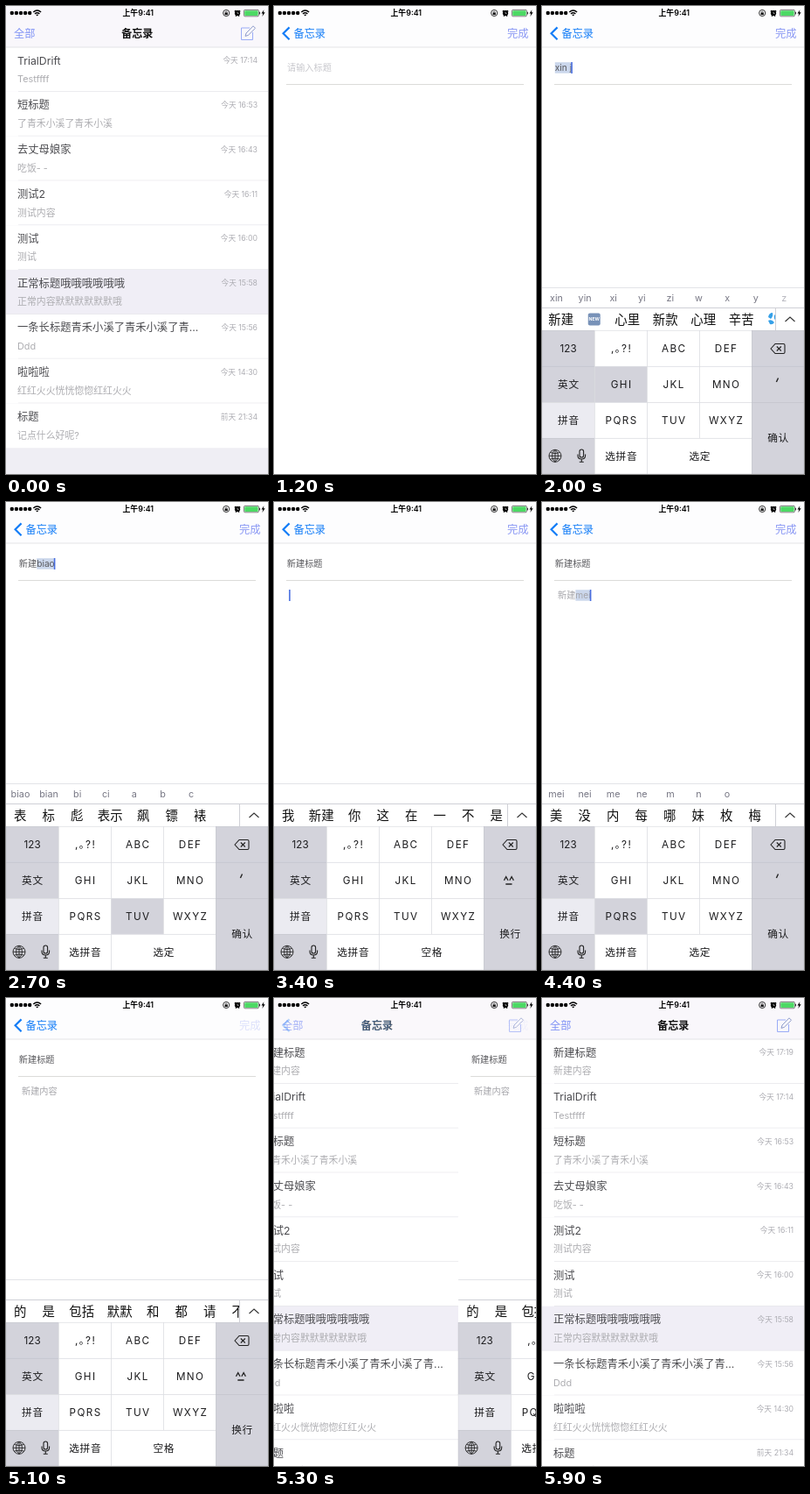
Recreate the animation shown at these times as an HTML page. Size 300 px wide and 534 px high, loop 6 s.

```html
<!DOCTYPE html>
<html lang="zh-CN">
<head>
<meta charset="utf-8">
<title>备忘录</title>
<style>
html, body { margin: 0; width: 100%; height: 100%; overflow: hidden; background: #fff; }
svg { display: block; width: 300px; height: 534px; font-family: Inter, "Noto Sans CJK SC", "Noto Sans CJK", sans-serif; }
text { white-space: pre; }
</style>
</head>
<body>
<svg id="stage" viewBox="0 0 300 534"></svg>
<script>
const NS = 'http://www.w3.org/2000/svg';
const stage = document.getElementById('stage');
const LOOP = 6000, STEP = 100;

function el(parent, tag, attrs = {}) {
  const node = document.createElementNS(NS, tag);
  for (const k in attrs) node.setAttribute(k, attrs[k]);
  parent.appendChild(node);
  return node;
}
const group = parent => el(parent, 'g');
const rect = (parent, x, y, width, height, fill, more) => el(parent, 'rect', { x, y, width, height, fill, ...more });
const line = (parent, d, stroke, width = 1, more) =>
  el(parent, 'path', { d, fill: 'none', stroke, 'stroke-width': width, ...more });

// Text is placed by its vertical centre.
function label(parent, x, mid, text, size, fill, more) {
  const node = el(parent, 'text', { x, y: mid + size * 0.38, 'font-size': size, fill, ...more });
  node.textContent = text;
  return node;
}
const centered = { 'text-anchor': 'middle' };
const move = (node, x, y = 0) => node.setAttribute('transform', `translate(${x} ${y})`);
const show = (node, on) => node.setAttribute('display', on ? 'inline' : 'none');
const fade = (node, v) => node.setAttribute('opacity', v);

// ---- note list ----
const ROW = 50.8, TOP = 47;
const list = group(stage);
rect(list, 0, TOP, 300, 487, '#efeef4');
const notes = [
  ['新建标题', '新建内容', '今天 17:19'],
  ['TrialDrift', 'Testffff', '今天 17:14'],
  ['短标题', '了青禾小溪了青禾小溪', '今天 16:53'],
  ['去丈母娘家', '吃饭- -', '今天 16:43'],
  ['测试2', '测试内容', '今天 16:11'],
  ['测试', '测试', '今天 16:00'],
  ['正常标题哦哦哦哦哦哦', '正常内容默默默默默默哦', '今天 15:58'],
  ['一条长标题青禾小溪了青禾小溪了青...', 'Ddd', '今天 15:56'],
  ['啦啦啦', '红红火火恍恍惚惚红红火火', '今天 14:30'],
  ['标题', '记点什么好呢?', '前天 21:34']
];
const rows = notes.map(([title, body, date], i) => {
  const row = group(list), marked = i === 6, last = i === notes.length - 1;
  rect(row, 0, 0, 300, ROW, marked ? '#f0eef6' : '#fff');
  if (!last) line(row, `M${marked ? 0 : 14} ${ROW - 0.3}H300`, '#e3e2e7', 0.8);
  label(row, 13, 15, title, 12.3, '#4c4c50');
  label(row, 13, 36, body, 10.9, '#adadb1');
  label(row, 288, 15, date, 8.7, '#adadb3', { 'text-anchor': 'end' });
  return row;
});

// ---- editor ----
const editor = group(stage);
rect(editor, 0, 0, 300, 534, '#fff');
line(editor, 'M14 89.5H286', '#d8d8d5', 0.9);
const hint = label(editor, 15, 70, '请输入标题', 10.2, '#c9c9ce');
const mark = rect(editor, 0, 0, 0, 12.5, '#cbd7ec');
const fields = [
  { x: 14.8, mid: 70.4, fill: '#5a5a5e' },
  { x: 18, mid: 106.4, fill: '#a6a6ab' }
];
for (const f of fields) f.node = label(editor, f.x, f.mid, '', 10.2, f.fill);
const caret = rect(editor, 0, 0, 1.6, 13, '#4a6fe0');

// ---- keyboard ----
const board = group(editor);
const GRAY = '#d3d3db', RULE = '#cfd0d6';
rect(board, 0, 321, 300, 213, '#fff');
const pinyinBar = group(board), wordBar = group(board);
rect(board, 267.5, 345, 33, 26, '#fff');
line(board, 'M0 321.5H300', '#e3e4e8');
line(board, 'M0 344.5H300M267.5 345V370', RULE);
line(board, 'M278.5 360L284 355L289.5 360', '#333', 1.1);

const colX = [0, 60.3, 120.5, 180.5, 240.4, 300];
const rowY = [370.3, 411.3, 452.4, 493.3, 534];
const keys = {};
function key(name, col, r, fill, cols = 1, span = 1) {
  const x = colX[col], y = rowY[r];
  const w = colX[col + cols] - x, h = rowY[r + span] - y;
  const stroke = fill === GRAY ? '#c4c5cd' : '#dcdde2';
  const face = rect(board, x, y, w, h, fill, { stroke, 'stroke-width': 0.7 });
  if (!name) return;
  const latin = /^[ -~]+$|｡/.test(name);
  const gap = name === '123' ? 0 : latin ? 1.4 : 0.7;
  const text = label(board, x + w / 2 + gap / 2, y + h / 2 - 0.2, name, 11.7, '#1c1c1e',
    { ...centered, 'letter-spacing': gap });
  keys[name] = { face, fill, text };
}
['123', '英文'].forEach((n, i) => key(n, 0, i, GRAY));
key('拼音', 0, 2, '#ebebf1');
key('', 0, 3, GRAY);
[',｡?!', 'ABC', 'DEF', 'GHI', 'JKL', 'MNO', 'PQRS', 'TUV', 'WXYZ']
  .forEach((n, i) => key(n, 1 + i % 3, Math.floor(i / 3), '#fff'));
key('选拼音', 1, 3, '#fff');
key('空格', 2, 3, '#fff', 2);
key('', 4, 0, GRAY);
key('', 4, 1, GRAY);
key('换行', 4, 2, GRAY, 1, 2);

const ink = '#222';
line(board, 'M262 391L267 385.5H276.5Q278 385.5 278 387V395Q278 396.5 276.5 396.5H267ZM268.8 388.5L273.8 393.5M273.8 388.5L268.8 393.5', ink, 1.1);
line(board, 'M8 513.3A7 7 0 1 0 22 513.3A7 7 0 1 0 8 513.3H22M15 506.3V520.3M15 506.3C10.5 510 10.5 516.6 15 520.3M15 506.3C19.5 510 19.5 516.6 15 520.3M9.5 509.5Q15 511.7 20.5 509.5M9.5 517.1Q15 514.9 20.5 517.1', ink, 0.9);
rect(board, 43, 506, 4.6, 9, 'none', { rx: 2.3, stroke: ink, 'stroke-width': 1.1 });
line(board, 'M41 511.5V513Q41 517 45.3 517Q49.6 517 49.6 513V511.5M45.3 517V520.3M42.8 520.3H47.8', ink, 1.1);
const smile = line(board, 'M263.4 431.8L265.7 427.6L268 431.8M269.8 431.8L272.1 427.6L274.4 431.8M265.3 436H272.5', ink, 1.3);
const quote = line(board, 'M270.5 424.5L268.4 429', ink, 1.4);

// ---- navigation bar ----
const nav = group(stage);
rect(nav, 0, 0, 300, 47, '#fdfdfe');
const navTint = rect(nav, 0, 0, 300, 47, '#f9f7fb');
line(nav, 'M0 47H300', '#e0e0e4', 0.9);
const VIOLET = '#8a98f4', BLUE = '#147df7';
const listItems = group(nav);
label(listItems, 9, 31, '全部', 12.2, '#7f92f5');
line(listItems, 'M279 25H269.5V38.5H282.5V30', '#9aabf6', 1);
line(listItems, 'M274 34.4L275 31L283 22.8L285.5 25.3L277.3 33.4Z', '#8090c4', 0.9);
const title = label(nav, 150.3, 31, '备忘录', 12.1, '#111', { ...centered, 'font-weight': 600 });
const chevron = line(nav, 'M17.6 24.4L10.6 31.3L17.6 38.2', BLUE, 2.2);
const back = label(nav, 22.5, 31, '备忘录', 12.2, BLUE);
const done = label(nav, 291.5, 31, '完成', 12.3, VIOLET, { 'text-anchor': 'end', 'font-weight': 500 });

// ---- status bar ----
const status = group(stage);
for (let i = 0; i < 5; i++) el(status, 'circle', { cx: 6.8 + i * 5.1, cy: 8, r: 2.2, fill: '#000' });
line(status, 'M31.3 7Q35.7 3 40.1 7M33 8.9Q35.7 6.4 38.4 8.9', '#000', 1.4);
el(status, 'path', { d: 'M34.2 10Q35.7 8.8 37.2 10L35.7 11.6Z' });
label(status, 151.3, 8, '上午9:41', 8.9, '#000', { ...centered, 'font-weight': 600 });
el(status, 'circle', { cx: 252.2, cy: 8, r: 3.6, fill: 'none', stroke: '#000', 'stroke-width': 0.8 });
rect(status, 250.6, 7.6, 3.2, 2.5, '#000');
line(status, 'M251.2 7.7V6.8Q252.2 5.3 253.2 6.8V7.7', '#000', 0.6);
el(status, 'circle', { cx: 265, cy: 8.2, r: 3.1 });
line(status, 'M261.7 6.3L263.4 4.8M268.3 6.3L266.6 4.8M263 11.8L263.7 10.8M267 11.8L266.3 10.8', '#000', 1.1);
line(status, 'M265 6.6V8.4H266.5', '#fff', 0.6);
rect(status, 272.4, 4.4, 17, 7.4, '#fff', { rx: 1.3, stroke: '#222', 'stroke-width': 0.6 });
rect(status, 273.2, 5.2, 15.4, 5.8, '#4cd964', { rx: 0.7 });
rect(status, 290.1, 6.8, 0.9, 2.6, '#222');
el(status, 'path', { d: 'M295.4 4.2L292.4 8.6H294.2L293.4 12L296.6 7.3H294.7Z' });

// ---- input suggestions: composition -> [syllables, words] ----
const suggest = {
  x: ['w x y z', '我 一 在 有 想 这 要 下'],
  xi: ['xi yi zi w x y z', '一 系 以 也 西 已 洗 系统'],
  xin: ['xin yin xi yi zi w x y z', '新 因 心 音 信 引 银 欣'],
  'xin j': ['xin yin xi yi zi w x y z', '新建 NEW 心里 新款 心理 辛苦 ~'],
  'xin ji': ['xin yin xi yi zi w x y z', '心急 新建 新疆 音箱 新机 心'],
  'xin jia': ['xin yin xi yi zi w x y z', '新建 新家 新加 因家 心 新'],
  b: ['a b c', '吧 不 啊 才 把 被 从 本'],
  bi: ['bi ci ai a b c', '比 次 爱 此 必 笔 词 币'],
  bia: ['bia ci bi ai a b c', '标 表 比 别 次 必 边 变'],
  biao: ['biao bian bi ci a b c', '表 标 彪 表示 飙 镖 裱'],
  'biao t': ['biao bi ci ai a b c', '标题 表态 标 表 标图 彪'],
  'biao ti': ['biao bi ci ai a b c', '标题 表体 标 表 彪 飙'],
  m: ['m n o', '你 没 那 哦 吗 呢 嗯 某'],
  me: ['me ne m n o', '么 呢 吗 哦 讷 你 没 那'],
  mei: ['mei nei me ne m n o', '美 没 内 每 哪 妹 枚 梅'],
  'nei r': ['mei nei me ne m n o', '内容 没人 内 每 美人 每日'],
  'nei ro': ['nei mei me ne m n o', '内容 没肉 内 没 美肉 每'],
  'nei rong': ['nei mei me ne m n o', '内容 内 没 美容 每 美']
};
const idle = {
  empty: '我 新建 你 这 在 一 不 是',
  新建: '的 一个 了 在 文件 和 是 群',
  新建标题: '的 是 和 党 栏 都 不 了',
  新建内容: '的 是 包括 默默 和 都 请 不'
};

// [time, field, committed text, composition, pressed key]
const script = [
  [1400, 0, '', '', ''],
  [1600, 0, '', '', 'WXYZ'], [1700, 0, '', 'x', 'GHI'], [1800, 0, '', 'xi', 'MNO'],
  [1900, 0, '', 'xin', 'JKL'], [2000, 0, '', 'xin j', 'GHI'], [2100, 0, '', 'xin ji', 'ABC'],
  [2200, 0, '', 'xin jia', 'MNO'], [2300, 0, '新建', '', 'ABC'], [2400, 0, '新建', 'b', 'GHI'],
  [2500, 0, '新建', 'bi', 'ABC'], [2600, 0, '新建', 'bia', 'MNO'], [2700, 0, '新建', 'biao', 'TUV'],
  [2800, 0, '新建', 'biao t', 'GHI'], [2900, 0, '新建', 'biao ti', 'GHI'], [3000, 0, '新建', 'biao ti', ''],
  [3100, 0, '新建', 'biao ti', '空格'], [3200, 0, '新建标题', '', '空格'], [3300, 0, '新建标题', '', ''],
  [3400, 1, '', '', ''], [3500, 1, '', '', 'WXYZ'], [3600, 1, '', 'x', 'GHI'],
  [3700, 1, '', 'xi', 'MNO'], [3800, 1, '', 'xin', 'JKL'], [3900, 1, '', 'xin j', 'GHI'],
  [4000, 1, '', 'xin jia', '空格'], [4100, 1, '新建', '', 'MNO'], [4200, 1, '新建', 'm', 'DEF'],
  [4300, 1, '新建', 'me', 'GHI'], [4400, 1, '新建', 'mei', 'PQRS'], [4500, 1, '新建', 'nei r', 'MNO'],
  [4600, 1, '新建', 'nei ro', 'MNO'], [4700, 1, '新建', 'nei rong', '空格'],
  [4800, 1, '新建内容', '', '']
];

function drawWords(words) {
  wordBar.replaceChildren();
  let x = 0;
  for (const word of words.split(' ')) {
    const single = word.length === 1 || word === 'NEW';
    const w = single ? 32.5 : 14.5 + word.length * 14.5, mid = x + w / 2;
    if (word === 'NEW') {
      rect(wordBar, mid - 7, 350.5, 14, 14, '#7892b8', { rx: 2 });
      label(wordBar, mid, 357.5, word, 5.2, '#fff', { ...centered, 'font-weight': 700 });
    } else if (word === '~') {
      el(wordBar, 'path', { fill: '#35a0e8', d: 'M259 355Q260 350 264 350Q265 354 262 357ZM259 359Q263 357 266 361Q264 364 261 363ZM266 353L268 351V359Q265 357 266 353Z' });
    } else {
      label(wordBar, mid, 357.3, word, 14.4, '#111', centered);
    }
    x += w;
    if (x > 268) break;
  }
}

function drawInput(t) {
  const now = script.filter(s => s[0] <= t).pop();
  const [, at, text, comp, pressed] = now || [0, 0, '', '', ''];
  fields[0].node.textContent = at ? '新建标题' : text + comp;
  fields[1].node.textContent = at ? text + comp : '';
  show(hint, !at && !text && !comp);

  const f = fields[at];
  const width = f.node.textContent ? f.node.getComputedTextLength() : 0;
  const start = text.length * 10.2;
  mark.setAttribute('x', f.x + start);
  mark.setAttribute('y', f.mid - 6.2);
  mark.setAttribute('width', comp ? width - start : 0);
  caret.setAttribute('x', f.x + width - 0.9);
  caret.setAttribute('y', f.mid - 6.4);
  show(caret, now && t < 4900);

  for (const name in keys) keys[name].face.setAttribute('fill', name === pressed ? GRAY : keys[name].fill);
  keys['空格'].text.textContent = comp ? '选定' : '空格';
  keys['换行'].text.textContent = comp ? '确认' : '换行';
  show(smile, !comp);
  show(quote, comp);

  const [syllables, words] = suggest[comp] || ['', idle[text || 'empty']];
  pinyinBar.replaceChildren();
  syllables.split(' ').forEach((s, i) =>
    label(pinyinBar, 16.5 + i * 32.6, 333, s, 10.8, i > 7 ? '#b5b5bd' : '#777784', centered));
  drawWords(words);

  show(board, now);
  move(board, 0, 213 * Math.max(0, (1600 - t) / 260) ** 2);
}

const clamp = v => Math.min(1, Math.max(0, v));
function editorShare(t) {
  return t < 5200 ? 1 - (1 - clamp((t - 550) / 350)) ** 3 : (1 - clamp((t - 5100) / 600)) ** 3;
}

function draw(t) {
  const p = editorShare(t), saved = t >= 5100;
  rows.forEach((row, i) => {
    show(row, i || saved);
    move(row, 0, TOP + (i - (saved ? 0 : 1)) * ROW);
  });
  move(list, -90 * p);
  move(editor, 300 * (1 - p));
  show(editor, p > 0);
  move(title, -109 * p);
  move(back, 109 * (1 - p));
  for (const item of [title, listItems, navTint]) fade(item, 1 - p);
  for (const item of [back, chevron]) fade(item, p);
  fade(done, saved ? 0.28 * p : p);
  drawInput(t);
}

const began = performance.now();
let last = -1;
function loop() {
  const t = Math.floor((performance.now() - began) % LOOP / STEP) * STEP;
  if (t !== last) draw(last = t);
  requestAnimationFrame(loop);
}
loop();
</script>
</body>
</html>
```
